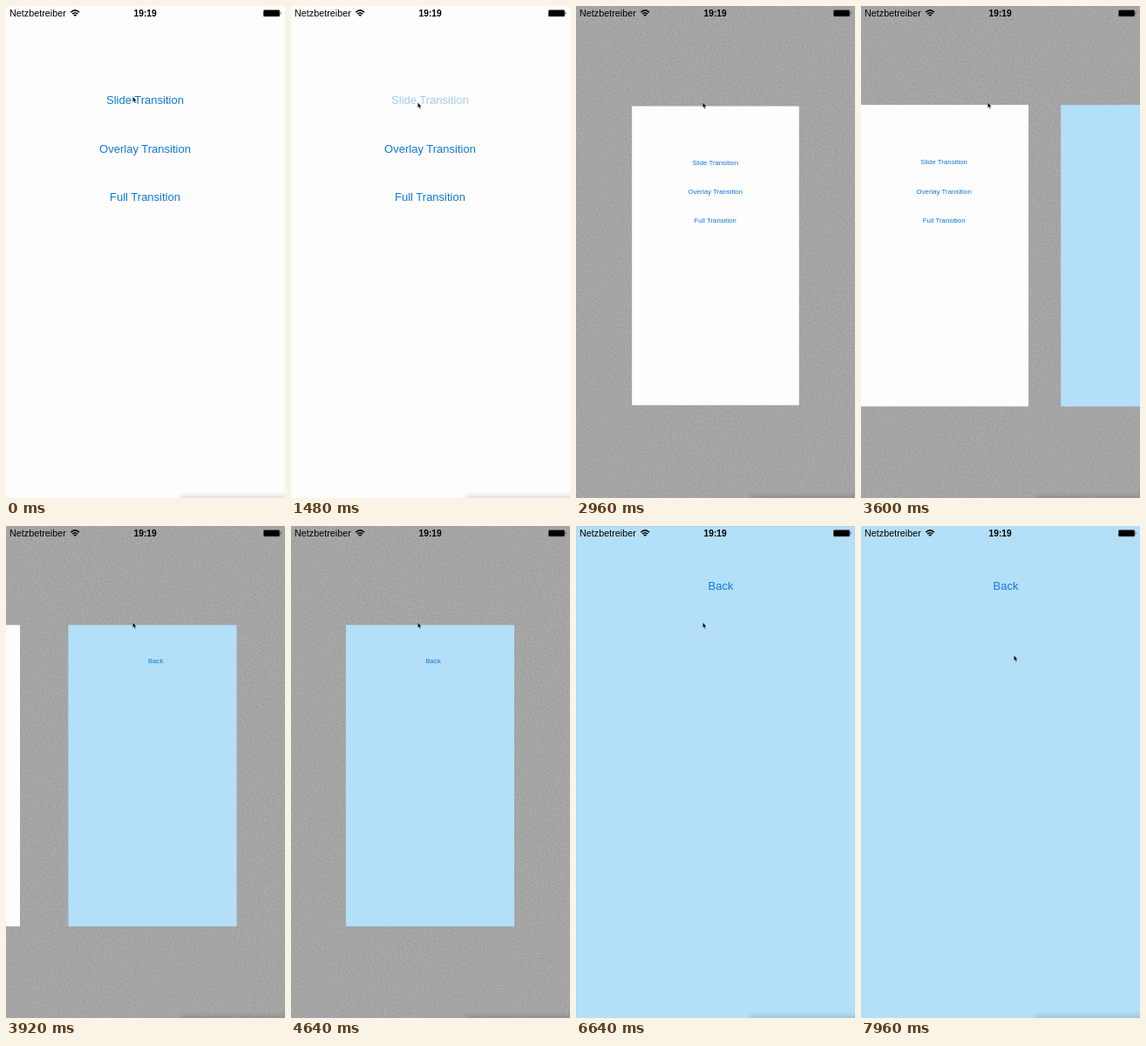
An HTML page that plays this animation: 320 by 563 pixels, repeating every 8000 ms.

```html
<!DOCTYPE html>
<html lang="en">
<head>
<meta charset="utf-8">
<title>Slide transition</title>
<style>
  html, body { margin: 0; width: 100%; height: 100%; overflow: hidden; background: #a6a6a6; }
  svg { display: block; width: 100vw; height: 100vh; }
  text { font-family: "Liberation Sans", Arial, sans-serif; }
  .link { font-size: 13px; fill: #1079da; text-anchor: middle; }
</style>
</head>
<body>
<svg viewBox="0 0 320 563" preserveAspectRatio="none">
  <defs>
    <filter id="grain" x="0" y="0" width="100%" height="100%">
      <feTurbulence type="fractalNoise" baseFrequency=".55" numOctaves="2" seed="4"/>
      <feColorMatrix values="0 0 0 0 0  0 0 0 0 0  0 0 0 0 0  .2 0 0 0 -.07"/>
    </filter>
    <filter id="soft" x="-20%" y="-200%" width="140%" height="500%">
      <feGaussianBlur stdDeviation="2.5"/>
    </filter>
  </defs>

  <rect width="320" height="563" fill="#aaa"/>
  <rect width="320" height="563" filter="url(#grain)"/>

  <g id="menu">
    <rect width="320" height="571.4" fill="#fdfdfd"/>
    <text id="slide" class="link" x="159.5" y="112.4">Slide Transition</text>
    <text class="link" x="159.5" y="168.2">Overlay Transition</text>
    <text class="link" x="159.5" y="223.2">Full Transition</text>
  </g>

  <g id="detail">
    <rect width="320" height="571.4" fill="#b3dff9"/>
    <text class="link" x="166" y="73.2">Back</text>
  </g>

  <rect x="200" y="560" width="130" height="12" opacity=".12" filter="url(#soft)"/>

  <g id="status">
    <text x="4" y="12" font-size="10.8">Netzbetreiber</text>
    <g fill="none" stroke="#000" stroke-width="1.5">
      <path d="M74.3 7.2Q79.2 2.6 84.1 7.2M76.1 9.1Q79.2 6.3 82.3 9.1"/>
    </g>
    <path d="M77.3 10.2Q79.2 8.7 81.1 10.2L79.2 12.1Z"/>
    <text x="159.6" y="12" font-size="10.3" font-weight="bold" text-anchor="middle">19:19</text>
    <rect x="295" y="4.3" width="19.3" height="8" rx="1.6" fill="#555"/>
    <rect x="295.8" y="5.1" width="17.7" height="6.4" rx=".8"/>
    <path d="M314.9 6.8q1.4 1.5 0 3z"/>
  </g>

  <path id="cursor" d="M0 0V6.4L1.4 5.2L2.5 7.6L3.7 7L2.6 4.8H4.5Z" fill="#111" stroke="#fff" stroke-opacity=".7" stroke-width=".5"/>
</svg>

<script>
const LOOP = 8000, SMALL = 0.6035, CX = 160, CY = 285.7;
const el = id => document.getElementById(id);
const menu = el("menu"), detail = el("detail"), slide = el("slide"), cursor = el("cursor");

const ramp = (t, a, b) => Math.min(1, Math.max(0, (t - a) / (b - a)));
const ease = (t, a, b) => { const p = ramp(t, a, b); return p * p * (3 - 2 * p); };

// Damped spring from 0 to 1
function spring(t, start, damping = 0.7, speed = 6) {
  if (t <= start) return 0;
  const s = (t - start) / 1000 * speed, root = Math.sqrt(1 - damping * damping);
  return 1 - Math.exp(-damping * s) * (Math.cos(root * s) + damping / root * Math.sin(root * s));
}

function place(card, dx, scale) {
  card.setAttribute("transform", `translate(${CX + dx} ${CY}) scale(${scale}) translate(${-CX} ${-CY})`);
}

function draw(t) {
  const scale = 1 - (1 - SMALL) * (spring(t, 1885) - spring(t, 5157));
  place(menu, -258 * spring(t, 3455), scale);
  place(detail, 256.5 * (1 - spring(t, 3417)), scale);
  menu.style.display = t < 4240 ? "" : "none";
  detail.style.display = t > 3417 ? "" : "none";

  slide.setAttribute("opacity", 1 - 0.8 * (ease(t, 860, 1250) - ease(t, 1300, 1900)));

  const drift = ease(t, 20, 840), away = ease(t, 6900, 7400), back = ease(t, 7490, 7950);
  const x = 145.3 + 10 * Math.sin(Math.PI * drift) + 30 * away;
  const y = 103.6 + 6.6 * drift + 58.8 * away - 21.2 * back;
  cursor.setAttribute("transform", `translate(${x} ${y})`);
}

const begin = performance.now();
function tick() {
  draw((performance.now() - begin) % LOOP);
  requestAnimationFrame(tick);
}
tick();
</script>
</body>
</html>
```
